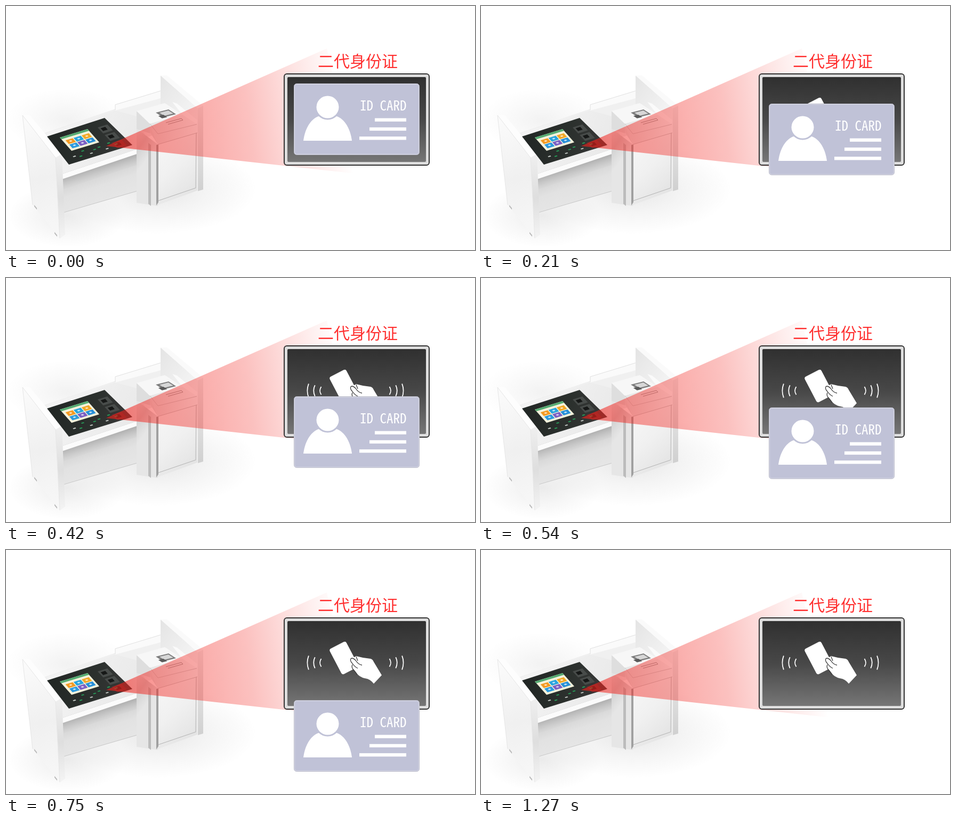
These frames come from a looping animation (880x460 px, 1.97 s). An HTML page with a canvas:

```html
<!DOCTYPE html>
<html lang="zh-CN">
<head>
<meta charset="utf-8">
<title>二代身份证</title>
<style>
html, body { margin: 0; width: 100%; height: 100%; overflow: hidden; background: #fff; }
canvas { display: block; }
</style>
</head>
<body>
<canvas id="stage" width="880" height="460"></canvas>
<script>
const WIDTH = 880, HEIGHT = 460;
const LOOP = 1970, STEP = 30, STEPS = 30, CARD_GONE = 1270;
const CARD_DROP = 164;

const stage = document.getElementById('stage').getContext('2d');

function layer(paint) {
  const canvas = document.createElement('canvas');
  canvas.width = WIDTH;
  canvas.height = HEIGHT;
  paint(canvas.getContext('2d'));
  return canvas;
}

const gray = v => `rgb(${v},${v},${v})`;
const shift = ([x, y], dx, dy) => [x + dx, y + dy];

function blend(c, [x0, y0], [x1, y1], ...colors) {
  const g = c.createLinearGradient(x0, y0, x1, y1);
  colors.forEach((color, i) => g.addColorStop(i / (colors.length - 1), color));
  return g;
}

function trace(c, points) {
  c.beginPath();
  points.forEach(p => c.lineTo(...p));
}

function poly(c, fill, ...points) {
  trace(c, points);
  c.closePath();
  c.fillStyle = fill;
  c.fill();
}

function line(c, stroke, ...points) {
  trace(c, points);
  c.strokeStyle = stroke;
  c.lineWidth = 1;
  c.stroke();
}

// Upright face hanging from the edge a-b
function face(c, a, b, ha, hb, fill) {
  poly(c, fill, a, b, shift(b, 0, hb), shift(a, 0, ha));
}

// Runs paint in a unit square spanned by u and v
function plane(c, origin, u, v, paint) {
  c.save();
  c.transform(...u, ...v, ...origin);
  paint((x, y, w, h, fill) => {
    c.fillStyle = fill;
    c.fillRect(x, y, w, h);
  });
  c.restore();
}

function box(c, x, y, w, h, r, fill, stroke, width = 1) {
  c.beginPath();
  c.roundRect(x, y, w, h, r);
  c.fillStyle = fill;
  c.fill();
  if (stroke) {
    c.strokeStyle = stroke;
    c.lineWidth = width;
    c.stroke();
  }
}

function circle(c, x, y, r, fill) {
  c.beginPath();
  c.arc(x, y, r, 0, Math.PI * 2);
  c.fillStyle = fill;
  c.fill();
}

function glow(c, x, y, rx, ry, alpha) {
  c.save();
  c.translate(x, y);
  c.scale(rx, ry);
  const g = c.createRadialGradient(0, 0, 0, 0, 0, 1);
  [1, 0.45, 0].forEach((k, i) => g.addColorStop(i / 2, `rgba(90,90,90,${alpha * k})`));
  circle(c, 0, 0, 1, g);
  c.restore();
}

function drawDesk(c) {
  glow(c, 285, 345, 185, 85, 0.15);
  glow(c, 115, 395, 110, 60, 0.12);
  glow(c, 115, 215, 115, 60, 0.08);

  const panelBack = [31, 206], panelFront = [93, 286];
  const deskLeft = [104, 317], deskRight = [269, 262];
  const wallBack = [290, 131], wallFront = [360, 193];

  // Right side panel, back wall and ledge
  face(c, wallBack, wallFront, 150, 155, blend(c, wallBack, wallFront, gray(228), gray(244)));
  poly(c, gray(250), wallBack, shift(wallBack, 12, 0), shift(wallFront, 10, -5), wallFront);
  face(c, wallFront, shift(wallFront, 10, -5), 156, 158,
    blend(c, [0, 190], [0, 348], gray(240), gray(208)));
  face(c, [70, 240], [290, 165], 60, 75, gray(240));
  face(c, [205, 186], [290, 160], 11, 14, gray(250));
  line(c, gray(224), [205, 196], [205, 186], [290, 160]);

  // Table top, its front edge and the space beneath
  poly(c, blend(c, [100, 230], [250, 300], gray(243), gray(232)),
    [76, 240], [205, 197], [246, 208], deskRight, deskLeft);
  face(c, deskLeft, deskRight, 73, 81, blend(c, [130, 318], [152, 384], gray(206), gray(226), gray(230)));
  face(c, deskLeft, deskRight, 30, 30, blend(c, [187, 299], [194, 321], gray(178), 'rgba(205,205,205,0)'));
  face(c, deskLeft, deskRight, 10, 9, gray(251));
  line(c, gray(200), shift(deskLeft, 5, 72), shift(deskRight, 0, 80));

  // Left side panel
  poly(c, blend(c, [40, 220], [95, 430], gray(250), gray(240), gray(247)),
    panelBack, panelFront, [101, 438], [50, 375]);
  poly(c, gray(253), panelBack, shift(panelBack, 13, -1), shift(panelFront, 12, -7), panelFront);
  poly(c, blend(c, panelFront, [101, 438], gray(238), gray(222), gray(244)),
    panelFront, shift(panelFront, 12, -7), [111, 431], [101, 438]);
  line(c, gray(230), [50, 375], panelBack, panelFront, [101, 438]);
  for (const foot of [[53, 375], [91, 426]]) face(c, foot, shift(foot, 5, 6), 3, 3, gray(185));

  drawConsole(c);
  drawCabinet(c);
}

function drawConsole(c) {
  poly(c, blend(c, [90, 240], [235, 270], '#222725', '#2b302d', '#383838'),
    [77, 246], [185, 211], [237, 262], [118, 299]);

  plane(c, [77, 246], [107, -34], [47, 51], rect => {
    for (let i = 0; i < 3; i++) {
      rect(0.8, 0.2 + i * 0.28, 0.17, 0.22, i === 2 ? '#5c3030' : '#484c4a');
      rect(0.83, 0.25 + i * 0.28, 0.08, 0.1, '#161817');
    }
    for (let i = 0; i < 9; i++) {
      rect(0.1 + i * 0.09, 0.8 + 0.08 * Math.sin(i * 2.4), 0.045, 0.03, i % 3 ? '#279d59' : '#c8ceca');
    }
  });

  plane(c, [101, 248], [52, -16], [22, 25], rect => {
    rect(0, 0, 1, 1, '#f5f3dc');
    rect(0, 0, 1, 0.13, '#55ab72');
    ['#f49a22', '#29a4de', '#f2a827', '#2c9ade', '#7b5fc4', '#268fd8'].forEach((color, i) => {
      const x = 0.09 + (i % 3) * 0.29, y = 0.27 + (i > 2) * 0.32;
      rect(x, y, 0.26, 0.28, color);
      rect(x + 0.09, y + 0.09, 0.08, 0.09, 'rgba(255,255,255,.7)');
    });
  });
}

function drawCabinet(c) {
  const left = [245, 231], corner = [285, 261], right = [359, 239];
  face(c, left, corner, 140, 116, blend(c, left, corner, gray(232), gray(210), gray(230)));
  face(c, [267, 258], [272, 262], 115, 115, gray(188));
  face(c, corner, right, 114, 109, blend(c, corner, [357, 345], gray(246), gray(240), gray(228)));
  face(c, shift(corner, -3, 1), shift(corner, 1, 0), 114, 109, gray(160));
  line(c, gray(178), shift(corner, 1, 106), shift(right, -3, 104), shift(right, -2, 0));

  // Printer: sloped lid over a low body
  const lidLeft = [270, 222], lidBack = [331, 205], lidRight = [358, 223];
  face(c, [245, 198], lidLeft, 34, 18, gray(222));
  face(c, lidLeft, corner, 16, 0, gray(228));
  poly(c, gray(247), [245, 198], [298, 183], lidBack, lidLeft);
  poly(c, gray(250), [312, 181], [321, 184], [359, 215], lidRight, lidBack);
  poly(c, blend(c, lidLeft, lidRight, gray(230), gray(245)),
    lidLeft, lidBack, lidRight, right, corner);
  line(c, gray(200), lidLeft, shift(corner, 0, -20), lidRight);
  line(c, gray(195), corner, right);
  plane(c, [281, 201], [24, -6], [14, 9], rect => {
    rect(0, 0, 1, 1, gray(125));
    rect(0.2, 0.15, 0.7, 0.65, gray(215));
    rect(-0.15, 0.6, 0.4, 0.5, gray(90));
  });
  line(c, gray(150), [300, 220], [329, 212], [332, 215], [304, 223]);
}

function drawBeam(c) {
  const apex = [188, 264];
  const reds = [0.62, 0.45, 0.37, 0.28, 0.13, 0].map(a => `rgba(242,32,26,${a})`);
  poly(c, blend(c, apex, [637, 202], ...reds), apex, [602, 80], [656, 316]);
}

function drawReader(c) {
  box(c, 522, 128, 272, 172, 5, '#ddd', '#333', 2);
  box(c, 528, 134, 260, 160, 2, blend(c, [0, 134], [0, 294], '#303030', '#484848', '#767676'));

  c.strokeStyle = '#fff';
  c.lineWidth = 1.8;
  for (const side of [-1, 1]) {
    for (let i = 0; i < 3; i++) {
      const x = 655.5 + side * (64 + i * 11.8), half = 7.5 + i * 2.8;
      c.beginPath();
      c.moveTo(x, 212.5 - half);
      c.quadraticCurveTo(x + side * 5, 212.5, x, 212.5 + half);
      c.stroke();
    }
  }
  drawHand(c);

  c.fillStyle = '#ff3030';
  c.font = '30px "Noto Sans CJK SC", "Noto Sans CJK", sans-serif';
  c.fillText('二代身份证', 585, 115);
}

function drawHand(c) {
  c.save();
  c.translate(634, 203.5);
  c.rotate(-0.48);
  box(c, -17.5, -27, 35, 54, 4, '#fff');
  c.restore();

  const hand = new Path2D(
    'M657 200Q671 204 684 205Q688 206 690 211L705 236L690 252Q683 243 674 242' +
    'Q663 240 656 230L647 218Q643 204 650 204Z');
  const creases = new Path2D(
    'M657 201L660 209M668 217Q661 216 656 208Q650 202 647 205Q645 209 650 214' +
    'Q654 220 660 223M650 216Q647 222 654 228L659 235');
  c.fillStyle = '#fff';
  c.fill(hand);
  c.strokeStyle = '#3b3b3b';
  c.lineWidth = 1.3;
  c.stroke(creases);
}

function drawCard(c) {
  const lilac = '#c0c2d7';
  box(c, 540.5, 146.5, 235, 134, 5, lilac, '#b8b9c8');
  box(c, 541.5, 147.5, 233, 132, 4, lilac, '#d8d9e5');

  c.fillStyle = '#fff';
  c.fill(new Path2D('M558 254C561 229 574 210 590 207L617 207C633 210 646 229 649 254Z'));
  circle(c, 603.5, 190.5, 24, lilac);
  circle(c, 603.5, 190.5, 21, '#fff');

  c.fillStyle = '#fff';
  [59, 69, 88].forEach((width, i) => c.fillRect(751 - width, 211.5 + i * 17.3, width, 6.3));

  const family = '"Noto Sans Mono CJK SC", "Noto Sans Mono", monospace';
  c.font = `25px ${family}`;
  if (c.measureText('ID CARD').width > 95) c.font = `21px ${family}`;
  c.fillText('ID CARD', 664, 196.5);
}

const scene = layer(c => {
  c.fillStyle = '#fff';
  c.fillRect(0, 0, WIDTH, HEIGHT);
  drawDesk(c);
  drawBeam(c);
  drawReader(c);
});
const card = layer(drawCard);
const start = performance.now();

function render() {
  const time = (performance.now() - start) % LOOP;
  const step = Math.min(STEPS, Math.floor(time / STEP));
  stage.drawImage(scene, 0, 0);
  if (time < CARD_GONE) stage.drawImage(card, 0, Math.round(CARD_DROP * step / STEPS));
  requestAnimationFrame(render);
}
render();
</script>
</body>
</html>
```
